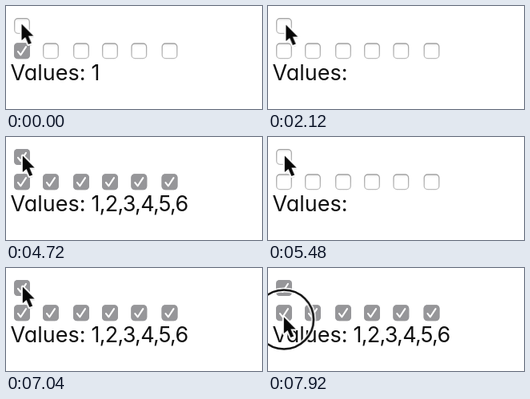
An HTML page that plays this animation: 320 px wide and 129 px high, repeating every 8 s.

```html
<!DOCTYPE html>
<html lang="en">
<head>
<meta charset="utf-8">
<title>Select all checkboxes</title>
<style>
  html, body { margin: 0; width: 100%; height: 100%; overflow: hidden; background: #fff; }
  svg { display: block; width: 320px; height: 129px; }

  .label {
    font: 400 27px Inter, Lato, sans-serif;
    font-feature-settings: "cv11";
    fill: #111;
  }
  .numbers { letter-spacing: -.75px; }

  .box { fill: url(#face); stroke: url(#edge); stroke-width: 1.3; }
  .fill { fill: #969699; }
  .tick { fill: none; stroke: #fff; stroke-width: 2.1; stroke-linecap: round; stroke-linejoin: round; }

  .all, .first, .ring { animation: all 8s step-end infinite; }
  .first { animation-name: first; }
  .ring { animation-name: ring; fill: none; stroke: #111; stroke-width: 2.6; }
  .halo { stroke: #fff; stroke-width: 6; stroke-opacity: .85; }
  .cursor { animation: move 8s linear infinite; }
  .arrow { fill: #080808; stroke: #fff; stroke-width: 3.8; stroke-linejoin: round; paint-order: stroke; }
  .shade { fill: #000; opacity: .12; }

  @keyframes all {
    0%, 17.5%, 68.5% { visibility: hidden; }
    15.5%, 36.5%, 83.5%, 100% { visibility: visible; }
  }
  @keyframes first {
    0%, 36.5%, 83.5%, 100% { visibility: visible; }
    17.5%, 68.5% { visibility: hidden; }
  }
  @keyframes ring {
    0%, 15.5%, 17.5%, 36%, 68%, 83% { visibility: hidden; }
    14.5%, 16.5%, 34%, 65%, 80.5%, 99%, 100% { visibility: visible; }
  }
  @keyframes move {
    0%, 1% { transform: translate(19.5px, 23px); }
    3% { transform: translate(23.7px, 23.8px); animation-timing-function: step-end; }
    26.5% { transform: translate(22.4px, 24px); animation-timing-function: step-end; }
    27.5% { transform: translate(20.8px, 24px); }
    88% { transform: translate(20.8px, 24px); animation-timing-function: ease-in-out; }
    94%, 100% { transform: translate(19.8px, 62px); }
  }
</style>
</head>
<body>
<svg viewBox="0 0 320 129">
  <defs>
    <linearGradient id="face" x2="0" y2="1">
      <stop offset="0" stop-color="#ececec"/>
      <stop offset=".22" stop-color="#fff"/>
    </linearGradient>
    <linearGradient id="edge" x2="0" y2="1">
      <stop offset="0" stop-color="#a2a2a2"/>
      <stop offset="1" stop-color="#bdbdbd"/>
    </linearGradient>
    <rect id="square" x="-9.3" y="-9.3" width="18.6" height="18.6" rx="4.2"/>
    <g id="checked">
      <rect class="fill" x="-10" y="-10" width="20" height="20" rx="4.5"/>
      <path class="tick" d="M-5 .8 L-1.6 5 L5 -5.2"/>
    </g>
    <path id="pointer" d="M0 -.5 V20 L4.7 15.9 L8.5 25 L12.3 23.4 L8.5 14.4 H14.8 Z"/>
  </defs>

  <g id="boxes"></g>

  <text class="label" x="5.5" y="93">Values:</text>
  <text class="label numbers" x="106.5" y="93"><tspan class="first">1</tspan><tspan class="all">,2,3,4,5,6</tspan></text>

  <g class="cursor">
    <circle class="ring halo" cx=".2" cy="2.5" r="37"/>
    <circle class="ring" cx=".2" cy="2.5" r="37"/>
    <use class="shade" href="#pointer" x="1" y="2.5"/>
    <use class="arrow" href="#pointer"/>
  </g>
</svg>
<script>
  const addBox = (x, y, state) => `
    <g transform="translate(${x} ${y})">
      <use class="box" href="#square"/>
      <use class="${state}" href="#checked"/>
    </g>`;
  const row = [20, 56, 94, 130, 166.3, 204.5];
  document.getElementById('boxes').innerHTML =
    addBox(20, 25, 'all') +
    row.map((x, i) => addBox(x, 56.3, i ? 'all' : 'first')).join('');
</script>
</body>
</html>
```
